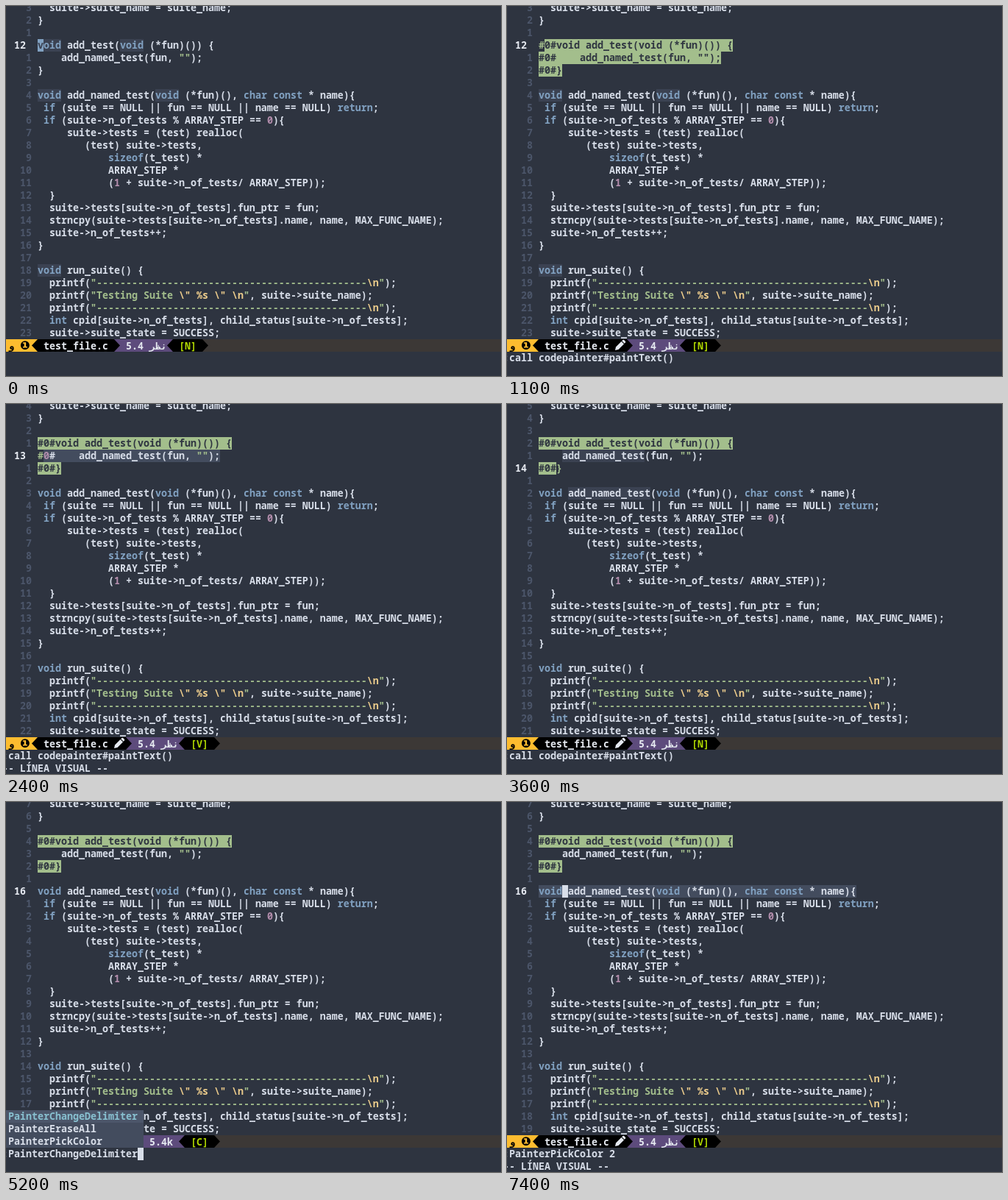
Animation, 673 px wide and 503 px high, one loop 8 s. Source, as an HTML page:

```html
<!DOCTYPE html>
<html lang="en">
<head>
<meta charset="utf-8">
<title>Painting lines in an editor</title>
<style>
  html, body { margin: 0; width: 100%; height: 100%; overflow: hidden; background: #2e3440; }
  #stage {
    position: relative; width: 673px; height: 503px; overflow: hidden;
    background: #2e3440; color: #d8dee9;
    font: 600 13.333px/17px "Noto Sans Mono", "DejaVu Sans Mono", monospace;
    font-variant-ligatures: none;
  }
  .row { position: absolute; left: -5px; height: 17px; white-space: pre; }
  .row span { display: inline-block; height: 17px; vertical-align: top; }
  .num { color: #4c566a; }
  .num.now { color: #e5e9f0; font-weight: 700; }
  #bar { position: absolute; left: 0; top: 453px; }
  #bar text { fill: #e5e9f0; white-space: pre; }
  #menu { position: absolute; left: -5px; top: 419px; width: 192px; background: #434c5e; }
  #menu div { height: 17px; padding-left: 8px; }
  #menu .on { background: #4c566a; color: #88c0d0; }
</style>
</head>
<body>
<div id="stage">
  <div id="code"></div>
  <svg id="bar" width="673" height="17"></svg>
  <div id="menu"></div>
  <div class="row" id="cmd" style="top:470px"></div>
  <div class="row" id="msg" style="top:487px"></div>
</div>
<script>
const C = {
  bg: '#2e3440', fg: '#d8dee9', key: '#81a1c1', str: '#a3be8c', esc: '#ebcb8b',
  num: '#b48ead', word: '#3b4252', sel: '#434c5e', paint: '#a3be8c'
};
const FIRST = 9, LOOP = 8000;
const RULE = '  printf("' + '-'.repeat(46) + '\\n");';
const LINES = [
  '  suite->suite_name = suite_name;',
  '}',
  '',
  'void add_test(void (*fun)()) {',
  '    add_named_test(fun, "");',
  '}',
  '',
  'void add_named_test(void (*fun)(), char const * name){',
  ' if (suite == NULL || fun == NULL || name == NULL) return;',
  ' if (suite->n_of_tests % ARRAY_STEP == 0){',
  '     suite->tests = (test) realloc(',
  '        (test) suite->tests,',
  '            sizeof(t_test) *',
  '            ARRAY_STEP *',
  '            (1 + suite->n_of_tests/ ARRAY_STEP));',
  '  }',
  '  suite->tests[suite->n_of_tests].fun_ptr = fun;',
  '  strncpy(suite->tests[suite->n_of_tests].name, name, MAX_FUNC_NAME);',
  '  suite->n_of_tests++;',
  '}',
  '',
  'void run_suite() {',
  RULE,
  '  printf("Testing Suite \\" %s \\" \\n", suite->suite_name);',
  RULE,
  '  int cpid[suite->n_of_tests], child_status[suite->n_of_tests];',
  '  suite->suite_state = SUCCESS;'
];
const ITEMS = ['PainterChangeDelimiter', 'PainterEraseAll', 'PainterPickColor'];
const VISUAL = '-- LÍNEA VISUAL --';

// Each step lists only what changes; the rest carries over.
const START = {
  line: 12, col: 0, mode: 'N', painted: [], sel: [], word: 'void',
  cmd: '', typing: false, item: -1, msg: '', edited: false
};
const STEPS = [
  [0, {}],
  [400, { mode: 'V', msg: VISUAL }],
  [600, { line: 13, sel: [12] }],
  [800, { line: 14, sel: [12, 13] }],
  [1100, { line: 12, mode: 'N', sel: [], msg: '', painted: [12, 13, 14], edited: true,
           cmd: ':call codepainter#paintText()' }],
  [1200, { word: '' }],
  [1700, { line: 13 }],
  [1900, { line: 14 }],
  [2000, { line: 13 }],
  [2400, { mode: 'V', msg: VISUAL, sel: [13] }],
  [2900, { mode: 'N', msg: '', sel: [], painted: [12, 14], col: 4 }],
  [3300, { word: 'add_named_test' }],
  [3600, { line: 14, col: 3 }],
  [3700, { word: '' }],
  [4000, { line: 15, col: 0 }],
  [4200, { line: 16, col: 4 }],
  [4500, { mode: 'C', cmd: ':', typing: true }],
  [4800, { cmd: ':P' }],
  [5000, { cmd: ':Pa' }],
  [5100, { cmd: ':Pai' }],
  [5200, { item: 0, cmd: ':' + ITEMS[0] }],
  [5800, { item: 1, cmd: ':' + ITEMS[1] }],
  [6000, { item: 2, cmd: ':' + ITEMS[2] }],
  [6200, { item: -1, cmd: ':' + ITEMS[2] + ' ' }],
  [6500, { cmd: ':' + ITEMS[2] + ' 2' }],
  [6700, { mode: 'N', typing: false }],
  [7400, { mode: 'V', msg: VISUAL, sel: [16] }]
];
let last = START;
const STATES = STEPS.map(([at, change]) => (last = { ...last, ...change, at }));

const $ = id => document.getElementById(id);
const safe = s => s.replace(/&/g, '&amp;').replace(/</g, '&lt;');

function cellsOf(text) {
  const cells = [...text].map(ch => ({ ch, fg: C.fg, bg: '' }));
  const tint = (re, fg) => {
    for (const m of text.matchAll(re))
      for (let i = 0; i < m[0].length; i++) cells[m.index + i].fg = fg;
  };
  tint(/\b(void|char|const|int|if|return|sizeof)\b/g, C.key);
  tint(/\b\d+\b/g, C.num);
  tint(/"(\\.|[^"\\])*"/g, C.str);
  tint(/\\.|%s/g, C.esc);
  return cells;
}

function spans(cells) {
  let html = '';
  for (let i = 0, j; i < cells.length; i = j) {
    const { fg, bg } = cells[i];
    for (j = i; j < cells.length && cells[j].fg === fg && cells[j].bg === bg;) j++;
    const run = cells.slice(i, j).map(c => c.ch).join('');
    html += `<span style="color:${fg};${bg && 'background:' + bg}">${safe(run)}</span>`;
  }
  return html;
}

function lineHtml(text, n, s) {
  const painted = s.painted.includes(n), selected = s.sel.includes(n);
  if (painted) text = '#0#' + text;
  const cells = cellsOf(text);
  if (s.word && !painted)
    for (const m of text.matchAll(new RegExp(`\\b${s.word}\\b`, 'g')))
      for (let i = 0; i < s.word.length; i++) cells[m.index + i].bg = C.word;
  cells.forEach((c, i) => {
    const cursor = n === s.line && i === s.col && !s.typing;
    if (painted && (!selected || cursor)) Object.assign(c, { fg: C.bg, bg: C.paint });
    else if (selected) c.bg = C.sel;
  });
  if (n === s.line && !s.typing) {
    const c = cells[s.col] || (cells[s.col] = { ch: ' ', fg: C.fg, bg: '' });
    [c.fg, c.bg] = [c.bg || C.bg, c.fg];
  }
  const now = n === s.line;
  const label = now ? '  ' + n + '  ' : String(Math.abs(n - s.line)).padStart(5) + ' ';
  return `<span class="num${now ? ' now' : ''}">${label.padEnd(6)}</span>` + spans(cells);
}

function barSvg(s) {
  const d = s.edited ? 16 : 0;
  const pill = (a, b) =>
    `<path d="M${a} 8.5l8-8.5H${b - 8}l8 8.5l-8 8.5H${a + 8}z"/>`;
  const text = (x, str, more = '') => `<text x="${x}" y="13.5" ${more}>${str}</text>`;
  const pencil = '<path fill="#e5e9f0" d="M147 15l1-4.5l7.5-7.5l3.5 3.5l-7.5 7.5z' +
    'M156.2 2.3l1.3-1.3q.8-.6 1.6 0l1.9 1.9q.6.8 0 1.6l-1.3 1.3z"/>';
  const share = s.item >= 0
    ? text(179 + d, '5.4k')
    : text(163 + d, '5.4') +
      text(195 + d, 'نظر', 'direction="ltr" font-family="DejaVu Sans Mono, monospace" font-size="13"');
  return '<rect width="673" height="17" fill="#3c3836"/>' +
    '<rect width="43" height="17" fill="#fdbc2f"/>' +
    `<rect x="${147 + d}" width="80" height="17" fill="#5d4b7c"/>` +
    pill(35, 155 + d) + pill(219 + d, 275 + d) +
    text(3, 'و', 'style="fill:#000" font-family="DejaVu Sans Mono, monospace" font-weight="700"') +
    text(19, '❶', 'style="fill:#000" font-family="DejaVu Sans, sans-serif" font-size="16"') +
    text(51, 'test_file.c') + (s.edited ? pencil : '') + share +
    text(235 + d, `[${s.mode}]`, 'style="fill:#afd700"');
}

function draw(s) {
  $('code').innerHTML = LINES.map((text, i) =>
    `<div class="row" style="top:${i * 17 - 6}px">${lineHtml(text, FIRST + i, s)}</div>`).join('');
  $('bar').innerHTML = barSvg(s);
  $('menu').innerHTML = s.item < 0 ? '' : ITEMS.map((name, i) =>
    `<div class="${i === s.item ? 'on' : ''}">${name}</div>`).join('');
  $('cmd').innerHTML = `<span>${s.cmd}</span>` +
    (s.typing ? `<span style="background:${C.fg}"> </span>` : '');
  $('msg').textContent = s.msg;
}

const begin = performance.now();
let shown = null;
function tick() {
  const t = (performance.now() - begin) % LOOP;
  const state = STATES.findLast(s => s.at <= t);
  if (state !== shown) draw(shown = state);
  requestAnimationFrame(tick);
}
tick();
</script>
</body>
</html>
```
